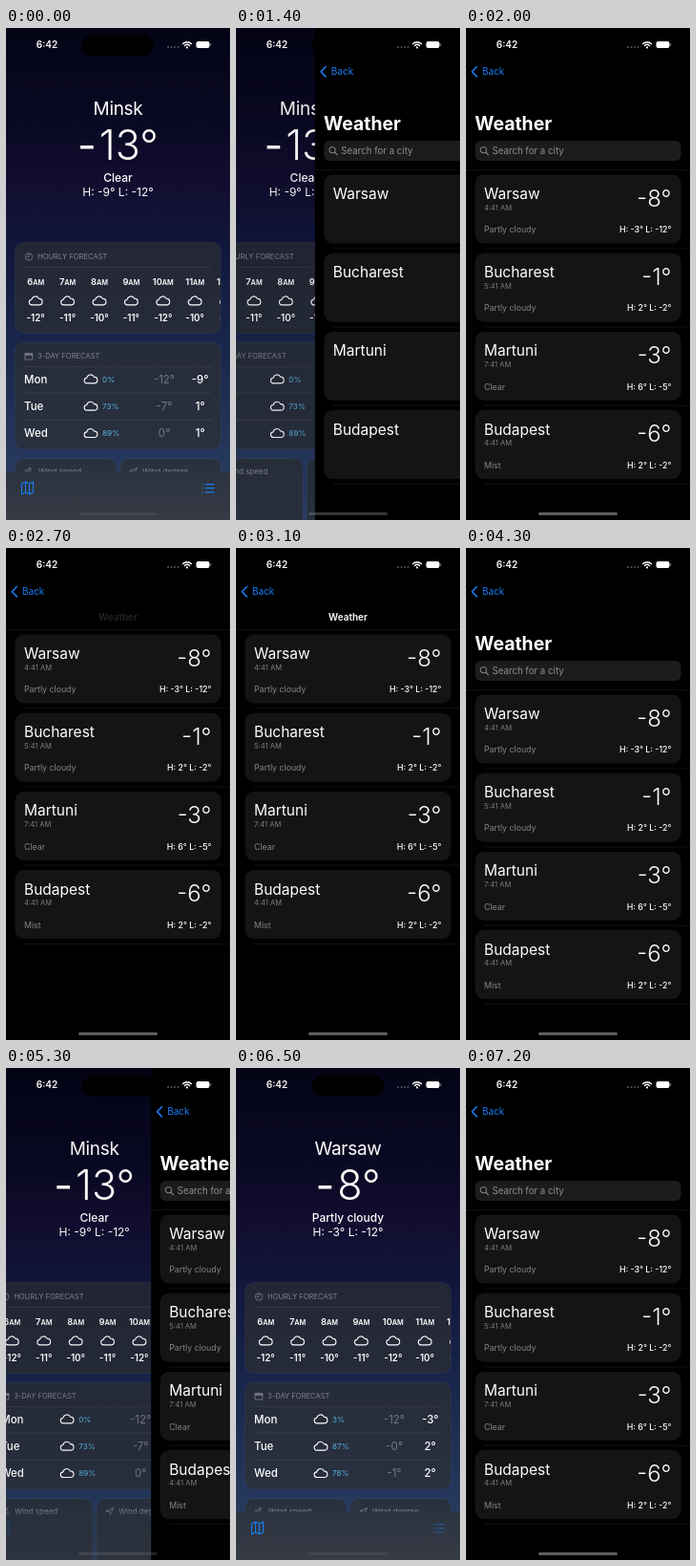
An HTML page that plays this animation: 235 by 515 pixels, repeating every 8 s.

```html
<!DOCTYPE html>
<html lang="en">
<head>
<meta charset="utf-8">
<title>Weather</title>
<style>
  html, body { margin: 0; width: 100%; height: 100%; overflow: hidden; background: #000; }
  svg { display: block; width: 235px; height: 515px; font-family: Inter, Roboto, sans-serif; }
  text { white-space: pre; }
</style>
</head>
<body>
<svg id="stage" viewBox="0 0 235 515"></svg>
<script>
const W = 235, H = 515, LOOP = 8000;
const GREY = '#82858f', BLUE = '#1a7df0';

const text = (x, y, size, str, { fill = '#fff', weight = 400, anchor = 'start', extra = '' } = {}) =>
  `<text x="${x}" y="${y}" font-size="${size}" font-weight="${weight}" fill="${fill}" text-anchor="${anchor}" ${extra}>${str}</text>`;
const mid = (x, y, size, str, opt) => text(x, y, size, str, { anchor: 'middle', ...opt });
const end = (x, y, size, str, opt) => text(x, y, size, str, { anchor: 'end', ...opt });
const box = (x, y, w, h, r, fill, extra = '') =>
  `<rect x="${x}" y="${y}" width="${w}" height="${h}" rx="${r}" fill="${fill}" ${extra}/>`;
const line = (x1, x2, y, stroke) =>
  `<path d="M${x1} ${y}H${x2}" stroke="${stroke}" stroke-width=".6"/>`;
const icon = (d, stroke, width = 1, extra = '') =>
  `<path d="${d}" fill="none" stroke="${stroke}" stroke-width="${width}" stroke-linecap="round" stroke-linejoin="round" ${extra}/>`;
const cloud = (x, y) =>
  icon('M-4.2 5a3 3 0 0 1-.4-6a4.3 4.3 0 0 1 8.2-1a3.5 3.5 0 0 1 .6 7z', '#fff', 1.15,
    `transform="translate(${x} ${y}) scale(.93)"`);
const card = (x, y, w, h) =>
  box(x, y, w, h, 9, 'rgb(44,46,52)', 'fill-opacity=".72" stroke="#fff" stroke-opacity=".07" stroke-width=".7"');

const places = {
  minsk: {
    name: 'Minsk', temp: '13°', sky: 'Clear', range: 'H: -9° L: -12°',
    days: [['Mon', '0%', '-12°', '-9°'], ['Tue', '73%', '-7°', '1°'], ['Wed', '89%', '0°', '1°']]
  },
  warsaw: {
    name: 'Warsaw', temp: '8°', sky: 'Partly cloudy', range: 'H: -3° L: -12°',
    days: [['Mon', '3%', '-12°', '-3°'], ['Tue', '87%', '-0°', '2°'], ['Wed', '78%', '-1°', '2°']]
  }
};
const hours = [['6', 'AM', -12], ['7', 'AM', -11], ['8', 'AM', -10], ['9', 'AM', -11],
  ['10', 'AM', -12], ['11', 'AM', -10], ['12', 'PM', -9]];
const cities = [
  ['Warsaw', '4:41 AM', 'Partly cloudy', '-8°', 'H: -3° L: -12°'],
  ['Bucharest', '5:41 AM', 'Partly cloudy', '-1°', 'H: 2° L: -2°'],
  ['Martuni', '7:41 AM', 'Clear', '-3°', 'H: 6° L: -5°'],
  ['Budapest', '4:41 AM', 'Mist', '-6°', 'H: 2° L: -2°']
];

const placeView = (id, p) => `<g id="${id}">
  ${mid(117.5, 91, 19, p.name, { extra: 'letter-spacing="-.3"' })}
  ${mid(117.5, 138, 43, `<tspan font-weight="400">-</tspan><tspan dx="3">${p.temp}</tspan>`, { weight: 300 })}
  ${mid(117.5, 160.5, 12, p.sky, { weight: 450 })}
  ${mid(117.5, 176, 12, p.range)}
  ${p.days.map(([day, rain, low, high], i) => {
    const y = 367.5 + i * 28.3;
    return text(19, y + 4.2, 11.5, day, { weight: 450 }) + cloud(89, y - .3) +
      text(101, y + 3, 8.2, rain, { fill: '#56b4e0' }) +
      mid(166, y + 4.2, 11.5, low, { fill: '#747985' }) +
      mid(203.7, y + 4.2, 11.5, high, { weight: 500 });
  }).join('')}</g>`;

const hourView = ([h, half, deg], i) => {
  const x = 31.2 + i * 33.4;
  return mid(x, 269, 9.3, `${h}<tspan font-size="7.3">${half}</tspan>`, { weight: 600 }) +
    cloud(x, 285.2) + mid(x, 307, 9.8, deg + '°', { weight: 600 });
};

const home = `<g id="home">
  ${box(0, 0, W, H, 0, 'url(#sky)')}
  ${card(9.4, 224.5, 216, 95)}${card(9.4, 329, 216, 112)}
  ${card(9.4, 450.5, 106.5, 80)}${card(120, 450.5, 105.5, 80)}
  <circle cx="24" cy="239.5" r="3.7" fill="none" stroke="${GREY}" stroke-width=".8"/>
  ${icon('M24 237v2.7h-1.9', GREY, .8)}
  ${text(33, 242.3, 7.6, 'HOURLY FORECAST', { fill: GREY })}
  ${line(19, 216, 250.3, '#42444e')}
  <g clip-path="url(#hourClip)">${hours.map(hourView).join('')}</g>
  ${icon('M20.3 340.5h7.4v6.6h-7.4z', GREY, .8)}${icon('M20.3 342h7.4', GREY, 1.4)}
  ${text(33, 346.3, 7.6, '3-DAY FORECAST', { fill: GREY })}
  ${[354.3, 382, 410.5].map(y => line(19, 216, y, '#434752')).join('')}
  ${placeView('minsk', places.minsk)}${placeView('warsaw', places.warsaw)}
  ${icon('M20 463h5a1.3 1.3 0 1 0-1.3-1.3M20 465h7a1.3 1.3 0 1 1-1.3 1.5M20 467h3.5', GREY, .8)}
  ${text(34, 467.3, 8, 'Wind speed', { fill: GREY })}
  ${icon('M130 464l7.5-3.5-3.4 7.5-.6-3.5z', GREY, .8)}
  ${text(143, 467.3, 8, 'Wind degree', { fill: GREY })}
  <g id="bar">
    ${box(0, 464.5, W, 51, 0, 'url(#barFill)')}
    ${icon('M16.5 477l4-2 4 2 4-2v11l-4 2-4-2-4 2zM20.5 475v11M24.5 477v11', BLUE, 1.1)}
    ${icon('M209.6 477.6h8.6M209.6 481.7h8.6M209.6 485.8h8.6M206.4 477.6h.1M206.4 481.7h.1M206.4 485.8h.1', BLUE, 1.2, 'id="listIcon"')}
  </g>
  <rect id="dim" width="${W}" height="${H}" opacity="0"/>
</g>`;

const cityView = ([name, time, sky, temp, range], i) => {
  const y = 153.5 + i * 82.2;
  return box(9.5, y, 216, 72, 9, '#141414') +
    text(19, y + 25.5, 15.5, name) +
    `<g class="data">${text(19, y + 37.3, 7.6, time, { fill: '#7d7d80' })}
    ${text(19, y + 60.7, 8.8, sky, { fill: '#858588' })}
    ${end(215.5, y + 33, 24, temp, { weight: 300 })}
    ${end(215.5, y + 60.7, 8.8, range, { weight: 500 })}</g>`;
};

const list = `<g id="list">
  ${box(0, 0, W, H, 0, '#000')}
  ${icon('M11.3 40.5l-5 5.2 5 5.2', BLUE, 1.6)}
  ${text(17, 49.4, 10, 'Back', { fill: BLUE })}
  ${mid(117.5, 75.6, 10, 'Weather', { weight: 600, extra: 'id="smallTitle"' })}
  <g clip-path="url(#listClip)">
    <g id="bigTitle">${text(0, 0, 19.4, 'Weather', { weight: 700 })}</g>
    <g id="search">
      <rect id="field" x="9.5" y="118" width="216" height="21" rx="6" fill="#1c1c1e"/>
      <g id="hint"><circle cx="18.3" cy="127.7" r="3.2" fill="none" stroke="#8e8e93"/>
      ${icon('M20.7 130.1l2.6 2.6', '#8e8e93', 1.1)}
      ${text(27.5, 131.9, 9.7, 'Search for a city', { fill: '#8e8e93' })}</g>
    </g>
    <g id="rows">
      ${[0, 1, 2, 3, 4].map(i => line(i ? 19 : 0, W, 148.6 + i * 82.2, '#1b1b1c')).join('')}
      ${cities.map(cityView).join('')}
    </g>
  </g>
</g>`;

const status = `
  ${box(80, 7.5, 75, 22, 11, '#000')}
  ${mid(43, 21.2, 10, '6:42', { weight: 600 })}
  ${[170, 173.5, 177, 180.5].map(x => `<circle cx="${x}" cy="20" r="1" fill="#55555c"/>`).join('')}
  ${icon('M185.6 16.6a6.3 6.3 0 0 1 8.8 0M187.4 18.5a3.8 3.8 0 0 1 5.2 0', '#fff', 1.4)}
  <circle cx="190" cy="20.4" r="1.1" fill="#fff"/>
  ${box(199.5, 14, 14, 7, 2.2, '#fff')}${box(214.3, 16.3, 1, 2.4, .5, '#888')}
  <rect id="grip" x="76" y="507" width="83" height="3" rx="1.5" fill="#777"/>`;

const stops = list => list.map(([at, color]) => `<stop offset="${at}" stop-color="${color}"/>`).join('');
document.getElementById('stage').innerHTML = `<defs>
  <linearGradient id="sky" x2="0" y2="1">${stops([[0, '#040416'], [.2, '#0a0924'], [.32, '#120e30'],
    [.42, '#11153a'], [.62, '#182449'], [.85, '#24365c'], [1, '#2b4066']])}</linearGradient>
  <linearGradient id="barFill" x2="0" y2="1">${stops([[0, '#2c3441'], [.5, '#313742'], [1, '#363b44']])}</linearGradient>
  <clipPath id="hourClip"><rect x="19" y="255" width="206" height="60"/></clipPath>
  <clipPath id="listClip"><rect y="85" width="${W}" height="430"/></clipPath>
</defs>${home}${list}${status}`;

const $ = id => document.getElementById(id);
const data = document.querySelectorAll('.data');
const clamp = v => Math.min(1, Math.max(0, v));
const ramp = (t, a, b) => clamp((t - a) / (b - a));
const move = (id, x, y) => $(id).setAttribute('transform', `translate(${x} ${y})`);
const fade = (id, v) => $(id).setAttribute('opacity', v);

// Critically damped spring from 0 to 1.
const spring = ms => {
  if (ms <= 0) return 0;
  const k = ms * .01372;
  return ms > 600 ? 1 : 1 - (1 + k) * Math.exp(-k);
};

const scrollSteps = [[2350, 0], [2400, 4], [2500, 26], [2600, 50], [2700, 63], [3250, 63], [3300, 52],
  [3400, 10], [3500, -27], [3600, -32], [3700, -25], [3800, -15], [3900, -7], [4000, -3], [4150, -1], [4300, 0]];
const scrollAt = t => {
  const i = scrollSteps.findIndex(s => s[0] > t);
  if (i < 1) return 0;
  const [t0, a] = scrollSteps[i - 1], [t1, b] = scrollSteps[i];
  return a + (b - a) * ramp(t, t0, t1);
};

function draw(t) {
  const p = spring(t - 1240) - spring(t - 5140) + spring(t - 6540);
  move('home', -.3 * W * p, 0);
  move('list', W * (1 - p), 0);
  fade('dim', .1 * p);
  fade('bar', clamp(1 - 2 * p));
  fade('grip', .2 + .6 * p * p);
  const pressed = (t >= 1200 && t < 1700) || t >= 6500;
  fade('listIcon', pressed ? .45 : 1);
  fade('minsk', t < 5400 ? 1 : 0);
  fade('warsaw', t < 5400 ? 0 : 1);

  const loading = t < 1700 || (t >= 6500 && t < 6900);
  data.forEach(el => el.setAttribute('opacity', loading ? 0 : 1));

  // The search field folds first, then the large title slides away.
  const s = scrollAt(t), over = Math.max(0, -s), fold = clamp(s / 31.5);
  const lift = over - Math.max(0, s - 31.5);
  move('rows', 0, -s);
  move('search', 0, lift);
  $('field').setAttribute('height', 21 * (1 - fold));
  fade('hint', clamp(1 - 3 * fold));
  $('bigTitle').setAttribute('transform', `translate(9.3 ${107 + lift}) scale(${1 + over * .0009})`);
  fade('smallTitle', ramp(t, 2660, 2960) * (1 - ramp(t, 3280, 3400)));
}

const start = performance.now();
(function tick() {
  draw((performance.now() - start) % LOOP);
  requestAnimationFrame(tick);
})();
</script>
</body>
</html>
```
